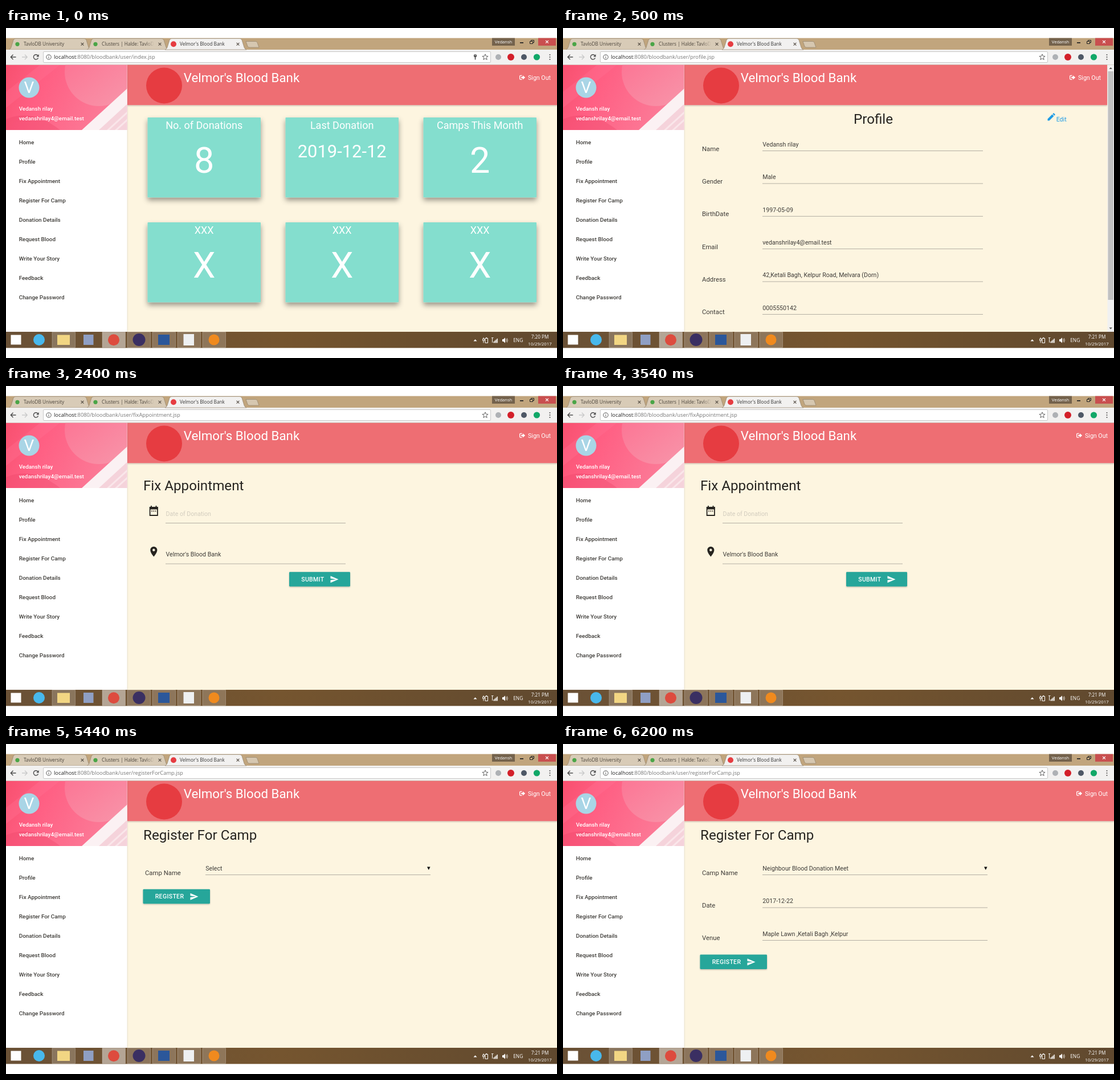
Animation of 967x579 px, one loop 8000 ms. Source, as an HTML page:

```html
<!DOCTYPE html>
<html lang="en">
<head>
<meta charset="utf-8">
<title>Blood bank dashboard</title>
<style>
  html, body { margin: 0; width: 100%; height: 100%; overflow: hidden; background: #fff; }
  svg { display: block; width: 967px; height: 579px; }
  text { font-family: Roboto, sans-serif; white-space: pre; }
  text.ui { font-family: "Open Sans", "Noto Sans", sans-serif; }
</style>
</head>
<body>
<svg id="stage" viewBox="0 0 967 579" xmlns="http://www.w3.org/2000/svg"></svg>
<script>
const LOOP = 8000;
const STARTS = [0, 500, 2400, 4300, 6200];
const INK = '#262420', SOFT = '#3d3b37', TEAL = '#26a69a';
const BRAND = "Velmor's Blood Bank";
const USER = 'Vedansh rilay', EMAIL = 'vedanshrilay4@email.test';

const rect = (x, y, w, h, fill, extra = '') =>
  `<rect x="${x}" y="${y}" width="${w}" height="${h}" fill="${fill}" ${extra}/>`;
const circle = (x, y, r, fill, extra = '') =>
  `<circle cx="${x}" cy="${y}" r="${r}" fill="${fill}" ${extra}/>`;
const path = (d, fill, extra = '') => `<path d="${d}" fill="${fill}" ${extra}/>`;
const stroke = (d, color, w = 1) => path(d, 'none', `stroke="${color}" stroke-width="${w}"`);
const text = (x, y, size, str, fill = SOFT, extra = '') =>
  `<text x="${x}" y="${y}" font-size="${size}" fill="${fill}" ${extra}>${str}</text>`;
const ui = (x, y, size, str, fill, extra = '') => text(x, y, size, str, fill, 'class="ui" ' + extra);
const at = (x, y, body) => `<g transform="translate(${x} ${y})">${body}</g>`;
const MID = 'text-anchor="middle"', MEDIUM = 'font-weight="500"';

const defs = `<defs>
  <linearGradient id="pink" x2="1" y2=".25">
    <stop offset="0" stop-color="#f8506f"/><stop offset=".35" stop-color="#ff5f83"/>
    <stop offset="1" stop-color="#fb7d99"/></linearGradient>
  <linearGradient id="disc" x2=".8" y2="1">
    <stop offset="0" stop-color="#fd6d8f"/><stop offset="1" stop-color="#f893a8"/></linearGradient>
  <linearGradient id="bar"><stop offset="0" stop-color="#6a5136"/>
    <stop offset=".5" stop-color="#75552f"/><stop offset="1" stop-color="#60492f"/></linearGradient>
  <linearGradient id="fade" gradientUnits="userSpaceOnUse" x1="244" x2="260" y1="0" y2="0">
    <stop offset="0" stop-color="#4b443b"/><stop offset="1" stop-color="#4b443b" stop-opacity="0"/></linearGradient>
  <filter id="deep" x="-20%" y="-20%" width="140%" height="150%">
    <feDropShadow dx="0" dy="5" stdDeviation="5" flood-color="#000" flood-opacity=".4"/></filter>
  <filter id="soft" x="-10%" y="-20%" width="120%" height="160%">
    <feDropShadow dx="0" dy="1.2" stdDeviation="1.1" flood-color="#000" flood-opacity=".26"/></filter>
  <clipPath id="view"><rect y="64.5" width="967" height="468.5"/></clipPath>
  <clipPath id="cover"><rect y="64.5" width="212.5" height="114.5"/></clipPath>
</defs>`;

// ---- browser window
const cross = (x, y, r, color, w) =>
  stroke(`M${x - r} ${y - r}l${2 * r} ${2 * r}m0 ${-2 * r}l${-2 * r} ${2 * r}`, color, w);

function tab(x, end, fill, label, color, labelFill) {
  return path(`M${x} 38Q${x + 3} 37 ${x + 4} 34L${x + 8} 21Q${x + 9} 18.5 ${x + 12} 18.5H${end - 12}
      Q${end - 9} 18.5 ${end - 8} 21L${end - 4} 34Q${end - 3} 37 ${end} 38Z`, fill, 'stroke="#93836c" stroke-width=".7"')
    + circle(x + 15, 28.3, color === '#e63c41' ? 5 : 3.6, color)
    + ui(x + 26, 31.2, 8.2, label, labelFill)
    + cross(end - 15, 28.3, 2.4, '#50483f', 1.1);
}

function browser() {
  let s = rect(0, 17.65, 967, 21, '#c1a57d')
    + tab(5, 149, '#d8cbb7', 'TavloDB University', '#4aa547', '#4b443b')
    + tab(142, 285, '#d8cbb7', 'Clusters | Halde: TavloDB', '#4aa547', 'url(#fade)')
    + rect(0, 38, 967, 26.5, '#f2f1f0')
    + tab(279, 422, '#f2f1f0', BRAND, '#e63c41', '#333')
    + path('M421 23.5H438Q440 23.5 441 25.5L444 34H427Q425 34 424 32Z', '#d6c7b0', 'stroke="#93836c" stroke-width=".7"')
    + rect(853, 17.65, 40, 13.3, '#74624c')
    + ui(873, 27.3, 7.6, 'Vedansh', '#fff', MID)
    + rect(902, 25, 6, 1.7, '#222')
    + stroke('M919.5 23.5h5v4h-5zM921.5 23v-1.5h5v4h-1.5', '#222', 1)
    + rect(934, 17.65, 31, 13.3, '#c94f4f')
    + cross(949.5, 24.3, 2.4, '#fff', 1.2);
  s += stroke('M17.5 51H8.5M12.5 46.8L8.3 51l4.2 4.2', '#4d4d4d', 1.4)
    + stroke('M28 51h9M33 46.8l4.2 4.2l-4.2 4.2', '#c9c9c9', 1.3)
    + stroke('M56.2 48.8a4.2 4.2 0 1 0 .3 3.6', '#4d4d4d', 1.4)
    + path('M57.6 46v4.4h-4.4z', '#4d4d4d')
    + rect(65.5, 41.5, 785, 19, '#fff', 'rx="1.5" stroke="#bdbdbd" stroke-width=".8"')
    + stroke('M79.2 51a4.2 4.2 0 1 0 -8.4 0a4.2 4.2 0 1 0 8.4 0M75 50.2v3.2M75 48.2v1', '#5c5c5c', 1)
    + path('M841 45.8l1.4 3.5 3.7.2-2.9 2.4 1 3.7-3.2-2.1-3.2 2.1 1-3.7-2.9-2.4 3.7-.2z', 'none', 'stroke="#555" stroke-width=".9"')
    + circle(864, 51, 5, '#aeb1b5') + circle(886, 51, 6, '#d3202a')
    + circle(909, 51, 5, '#4e5866') + circle(931.5, 51, 5.6, '#12a868');
  for (const y of [47, 51, 55]) s += circle(954.5, y, 1.1, '#555');
  return s + rect(0, 64, 967, .7, '#b9b3ab');
}

// ---- shared page parts
function sidebar() {
  const items = ['Home', 'Profile', 'Fix Appointment', 'Register For Camp', 'Donation Details',
    'Request Blood', 'Write Your Story', 'Feedback', 'Change Password'];
  const cover = rect(0, 64.5, 212.5, 114.5, 'url(#pink)')
    + path('M0 140L95 64.5H60L0 112Z', '#ff7594', 'opacity=".3"')
    + path('M0 179V160Q45 140 95 179Z', '#e83f63', 'opacity=".3"')
    + circle(163, 77, 60, 'url(#disc)')
    + path('M133 179L213 106V179Z', '#fbf1f3')
    + path('M163 179L213 133V179Z', '#f5d3db')
    + stroke('M178 180l36 -33M192 180l22 -20', '#fae6ea', 3);
  return rect(0, 64.5, 212.5, 468.5, '#fff', 'filter="url(#soft)"')
    + `<g clip-path="url(#cover)">${cover}</g>`
    + circle(40.5, 104.5, 18, '#a9d5e6')
    + text(40.5, 114.3, 28, 'V', '#fff', MID)
    + text(22.7, 144.8, 9.9, USER, '#fff', MEDIUM)
    + text(22.7, 161.8, 9.9, EMAIL, '#fff', MEDIUM)
    + items.map((label, i) => text(22.7, 204 + 33.98 * i, 9.9, label, SOFT, MEDIUM)).join('');
}

function header(end) {
  const icon = stroke('M4.5 .7H2.2Q.7 .7 .7 2.2V6.3Q.7 7.8 2.2 7.8H4.5', '#fff', 1.3)
    + path('M3.3 2.9H6V.6L10.2 4.25L6 7.9V5.6H3.3Z', '#fff');
  return rect(213, 64.5, end - 213, 70.7, '#ee6e73', 'filter="url(#soft)"')
    + circle(277.5, 101, 31.5, '#e63c41')
    + text(311.7, 94.8, 22.3, BRAND, '#fff')
    + at(end - 66, 82.6, icon)
    + text(end - 51, 90.5, 10.62, 'Sign Out', '#fff');
}

const title = (x, y, str, extra) => text(x, y, 24.2, str, INK, extra);
const rule = (x, y, w) => rect(x, y - .4, w, .8, '#a19d94');
const field = (y, label, value, w) =>
  text(244, y - .4, 11.33, label) + text(350.3, y - 8.2, 10.62, value) + rule(350, y - .4, w);

function button(x, y, w, label) {
  return rect(x, y, w, 25.5, TEAL, 'rx="1.4" filter="url(#soft)"')
    + text(x + 21.2, y + 16.4, 10.5, label, '#fff', 'letter-spacing=".35" ' + MEDIUM)
    + at(x + w - 34.5, y + 7, path('M0 0L14 6L0 12V7.4L10 6L0 4.6Z', '#fff'));
}

// ---- pages
function card(x, y, label, value, size, base) {
  return rect(x, y, 198.5, 140.3, '#84dece', 'rx="1" filter="url(#deep)"')
    + text(x + 99.2, y + 20, 18.05, label, '#fff', MID)
    + text(x + 99.2, y + base, size, value, '#fff', MID);
}

function home() {
  const cols = [248.5, 490.5, 732.5];
  return card(cols[0], 157, 'No. of Donations', '8', 63, 97)
    + card(cols[1], 157, 'Last Donation', '2019-12-12', 30.9, 70)
    + card(cols[2], 157, 'Camps This Month', '2', 63, 97)
    + cols.map(x => card(x, 341, 'XXX', 'X', 63, 97)).join('');
}

function profile() {
  const rows = [['Name', USER], ['Gender', 'Male'], ['BirthDate', '1997-05-09'], ['Email', EMAIL],
    ['Address', '42,Ketali Bagh, Kelpur Road, Melvara (Dorn)'], ['Contact', '0005550142']];
  return title(544.5, 168, 'Profile', MID)
    + path('M850.5 162.5V159.5L858.5 151.5L861.5 154.5L853.5 162.5ZM859.3 150.7L860.5 149.5Q861 149 861.6 149.5L863.5 151.4Q864 152 863.5 152.5L862.3 153.7Z', '#1e9be5')
    + text(865.7, 164, 10.62, 'Edit', '#1e9be5')
    + rows.map(([label, value], i) => field(216 + 57.35 * i, label, value, 387)).join('')
    + rect(955.5, 64.5, 11.5, 468.5, '#f1f1f1')
    + rect(956.5, 76, 9.5, 401, '#c1c1c1')
    + path('M958.5 72l2.7-3 2.7 3z', '#555')
    + path('M958.5 525.5l2.7 3 2.7-3z', '#555');
}

function appointment() {
  const calendar = stroke('M1.6 3H14.9V17H1.6Z', INK, 1.8) + rect(1, 2.2, 14.6, 4.3, INK)
    + rect(3, 0, 1.8, 3, INK) + rect(11.6, 0, 1.8, 3, INK)
    + [4.2, 7.4, 10.6].map(x => rect(x, 8.6, 1.7, 1.7, INK)).join('');
  return title(241, 183, 'Fix Appointment')
    + at(251, 210, calendar)
    + text(280.5, 228, 10.62, 'Date of Donation', '#d2ccbe') + rule(280, 240.5, 316)
    + path('M259.3 299.5Q253.2 292.3 253.2 287.8A6.1 6.1 0 0 1 265.4 287.8Q265.4 292.3 259.3 299.5ZM259.3 285.6a2.2 2.2 0 1 0 .01 0Z', INK, 'fill-rule="evenodd"')
    + text(280.5, 299.4, 10.62, BRAND) + rule(280, 312, 316)
    + button(497, 326.2, 107, 'SUBMIT');
}

const camp = (choice, more, y) => title(241, 168, 'Register For Camp')
  + field(230, 'Camp Name', choice, 395)
  + path('M739 215.5h5.6l-2.8 5.4z', '#111')
  + more + button(240.5, y, 117.5, 'REGISTER');

const pages = [
  home(), profile(), appointment(), camp('Select', '', 254.7),
  camp('Neighbour Blood Donation Meet',
    field(287.5, 'Date', '2017-12-22', 395)
    + field(344.8, 'Venue', 'Maple Lawn ,Ketali Bagh ,Kelpur', 395), 369.4)
];
const urls = ['index', 'profile', 'fixAppointment', 'registerForCamp', 'registerForCamp'];

// ---- taskbar
function taskbar() {
  let s = rect(0, 533, 967, 28.35, 'url(#bar)');
  [81, 169, 213, 257, 301, 345].forEach((x, i) => {
    s += rect(x, 533.5, 40.5, 27, '#fff', `fill-opacity="${i === 1 ? .48 : .2}" stroke="#fff" stroke-opacity=".3" stroke-width=".8"`);
  });
  s += rect(8.5, 538.5, 18, 17, '#fff') + circle(58, 547, 10, '#48b8ec')
    + rect(90, 538.5, 22, 17.5, '#f2d683') + rect(136, 538, 17.5, 18, '#8f9fc4')
    + circle(189, 547.3, 10, '#dd4b3e') + circle(233.5, 547, 11, '#3a2f62')
    + rect(267, 538, 20, 18, '#2b579a') + rect(311.5, 537, 18.5, 20, '#eef0f2')
    + circle(365, 547, 9.5, '#f08a1e');
  s += path('M820.5 549.5l3-3.2 3 3.2z', '#fff')
    + stroke('M841 544.5h4.5v8H841zM842.2 543.4h2M838 543v3M836.6 545.5h3v3h-3zM838 548.5v4', '#fff', 1)
    + stroke('M853.5 544v8M852 543.5h3.5', '#fff', .9)
    + [0, 1, 2, 3].map(i => rect(855.5 + 2 * i, 550 - 1.7 * i, 1.4, 2.5 + 1.7 * i, '#fff')).join('')
    + path('M871 546h2l3-2.8v9.6l-3-2.8h-2z', '#fff')
    + stroke('M877.5 545.5q1.5 2.5 0 5M879.3 544.3q2.2 3.7 0 7.4', '#fff', .8)
    + ui(898.7, 551, 8.4, 'ENG', '#fff', MID);
  return s + ui(937, 557, 7.8, '10/29/2017', '#fff', MID);
}

// ---- assemble
const scene = (body, i) => `<g class="scene" visibility="hidden">
  <g clip-path="url(#view)">${header(i === 1 ? 955 : 967)}${body}</g>
  ${ui(84, 54.3, 9.33, `localhost<tspan fill="#777">:8080/bloodbank/user/${urls[i]}.jsp</tspan>`, '#222')}
  ${i ? '' : circle(823.5, 48.7, 2.6, '#555') + rect(822.7, 50, 1.7, 5.5, '#555') + circle(823.5, 47.8, .8, '#fff')}
  ${ui(937, 545, 8.2, i ? '7:21 PM' : '7:20 PM', '#fff', MID)}
</g>`;

const stage = document.getElementById('stage');
stage.innerHTML = defs + rect(0, 0, 967, 579, '#fff') + rect(0, 64, 967, 469, '#fdf5e0')
  + browser() + taskbar() + pages.map(scene).join('')
  + `<g clip-path="url(#view)">${sidebar()}</g>`;
const scenes = [...stage.querySelectorAll('.scene')];

function draw() {
  const t = performance.now() % LOOP;
  const current = STARTS.filter(start => start <= t).length - 1;
  scenes.forEach((g, i) => g.setAttribute('visibility', i === current ? 'visible' : 'hidden'));
  requestAnimationFrame(draw);
}
draw();
</script>
</body>
</html>
```
